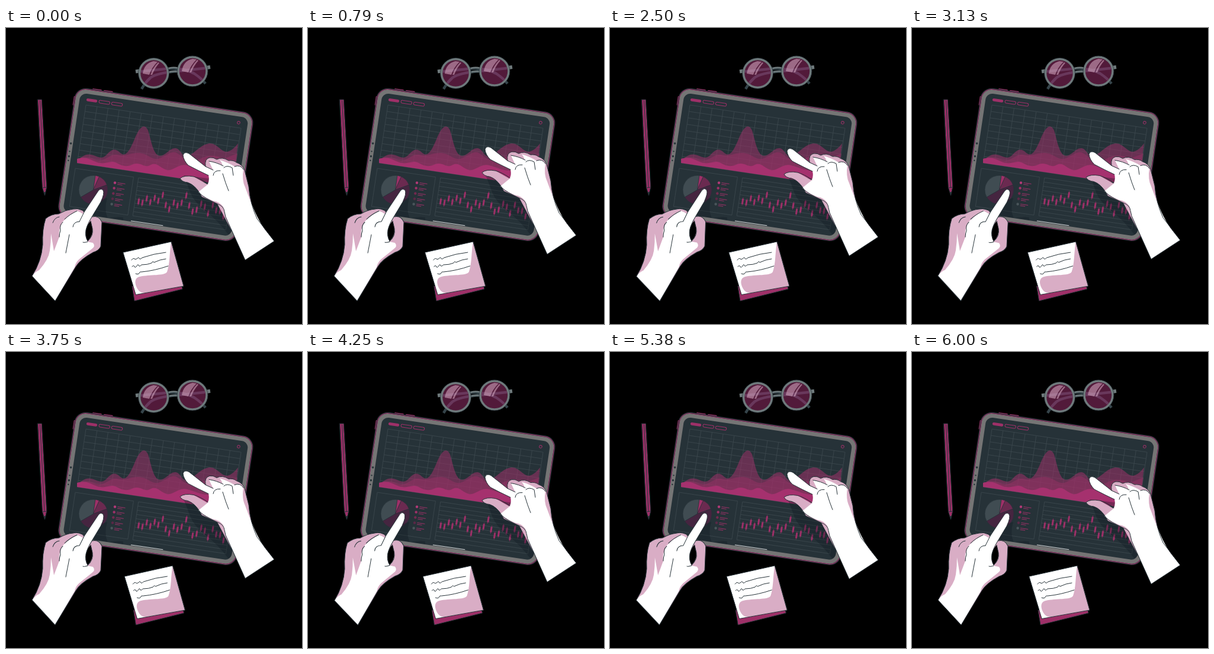
An HTML page that plays this animation: 500x500 px, repeating every 6.04 s.

```html
<!DOCTYPE html>
<html lang="en">
<head>
<meta charset="utf-8">
<title>Tablet dashboard</title>
<style>
  html, body { margin: 0; width: 100%; height: 100%; overflow: hidden; background: #000; }
  svg { display: block; width: 100vw; height: 100vh; }
  .ink { fill: none; stroke: #263238; stroke-width: 1; stroke-linecap: round; stroke-linejoin: round; }
  .skin { fill: #fff; }
  .shade { fill: #d9adc5; }
  .brand { fill: #9e3068; }
  .rule { fill: none; stroke: #3d494f; stroke-width: .8; }
  .edge { fill: none; stroke: #9e3068; stroke-width: 1; }
</style>
</head>
<body>
<svg viewBox="0 0 500 500">
  <defs>
    <linearGradient id="hill" x1="0" y1="0" x2="0" y2="1">
      <stop offset="0" stop-color="#9e3068" stop-opacity=".72"/>
      <stop offset="1" stop-color="#9e3068" stop-opacity=".82"/>
    </linearGradient>
    <clipPath id="lenses"><circle cx="249.500" cy="76.500" r="22"/><circle cx="315" cy="73" r="22"/></clipPath>
    <clipPath id="screen"><rect x="8" y="8" width="287" height="202" rx="11" transform="translate(119.200 100.400) rotate(8.500)"/></clipPath>
    <path id="arms" d="M222 74 L280 68 Q305 69 318 77 Q330 85 337 94 M343 67 L290 73 Q254 76 244 84 Q236 91 229 103"/>
  </defs>

  <!-- glasses -->
  <g fill="none">
    <use href="#arms" stroke="#35444a" stroke-width="4.500"/>
    <g fill="#521a3a"><circle cx="249.500" cy="76.500" r="23"/><circle cx="315" cy="73" r="23"/></g>
    <g clip-path="url(#lenses)">
      <use href="#arms" stroke="#69385c" stroke-width="4.500"/>
      <g fill="#d9adc5" opacity=".55">
        <path d="M231 77 Q233 60 249 56 L256 57 Q246 67 242 79 Z M244 79 Q248 67 257 58 L259 59 Q251 68 247 79 Z"/>
        <path d="M297 73 Q299 56 315 52 L322 53 Q312 63 308 75 Z M310 75 Q314 63 323 54 L325 55 Q317 64 313 75 Z"/>
      </g>
    </g>
    <g stroke="#6f7a7c" stroke-width="3.600">
      <circle cx="249.500" cy="76.500" r="24"/><circle cx="315" cy="73" r="24"/>
      <path d="M273 69 Q282 65 291 68 M274 75 Q282 72 291 74" stroke-width="2.400"/>
      <path d="M219 73.500 L226 72.500 M338 67 L345 66" stroke-width="6"/>
    </g>
    <g stroke="#263238" stroke-width=".7"><circle cx="249.500" cy="76.500" r="26"/><circle cx="315" cy="73" r="26"/></g>
  </g>

  <!-- pencil -->
  <path class="brand" d="M54 121 L60 121 L68.500 269 L65.500 282 L61.500 270 Z"/>
  <path class="ink" d="M53.500 121 L60.500 121 L68.800 269 L65.500 283 L61.500 270 Z M57.500 123 L65 269 M61.500 270 L68.500 269"/>
  <path d="M64 277 L67 277 L65.500 283 Z" fill="#263238"/>

  <!-- tablet -->
  <g transform="translate(119.200 100.400) rotate(8.500)">
    <g class="brand"><rect x="27" y="-2.500" width="16" height="4" rx="1.500"/><rect x="46" y="-2.500" width="16" height="4" rx="1.500"/><rect x="-2.200" y="15" width="4" height="16" rx="1.500"/></g>
    <rect width="303" height="218.500" rx="18" fill="#757575" stroke="#263238" stroke-width="2.400"/>
    <rect x=".6" y=".6" width="301.800" height="217.300" rx="17.400" class="edge" stroke-width="1.400"/>
    <rect x="8" y="8" width="287" height="202.500" rx="11" fill="#263238"/>
    <g id="dots" fill="#263238"></g>
    <rect x="19.500" y="15.500" width="18.500" height="4.800" rx="2.400" class="brand"/>
    <rect x="41" y="15.500" width="18.500" height="4.800" rx="2.400" class="edge"/>
    <rect x="62.500" y="15.500" width="18.500" height="4.800" rx="2.400" class="edge"/>
    <circle cx="279.600" cy="18.400" r="2.300" class="edge"/>
    <path id="grid" class="rule"/>
    <path id="panels" class="rule"/>
    <path d="M124 210 H179" stroke="#d5d8d9" stroke-width="1" transform="translate(0 -.7)"/>
  </g>
  <path fill="url(#hill)" opacity=".72" d="M120 227 C127 215 138 211 148 215 S163 222 171 213 S185 203 192 210 C202 220 209 207 217 188 C224 170 233 158 240 173 C246 193 249 215 260 216 C271 215 276 203 286 203 C296 204 297 220 308 216 C323 208 329 197 343 195 C357 194 363 210 374 209 C382 207 387 201 392 195 L383 267 Z"/>
  <path class="brand" opacity=".42" d="M120 227 C131 216 140 218 150 222 C166 229 175 211 188 214 C203 218 209 211 222 211 C240 211 244 223 257 221 C271 217 280 205 290 212 C304 222 311 229 326 222 C344 212 354 216 370 220 L391 212 L383 267 Z"/>
  <path fill="#a5316e" d="M120 228 V221 C135 216 143 223 154 227 C169 232 175 222 187 228 C198 234 204 235 215 230 C228 226 233 237 243 232 C255 225 260 237 272 240 C283 242 292 228 306 232 C322 236 337 245 350 239 L387 242 L383 267 Z"/>
  <g id="pie"></g>
  <g id="legend"></g>
  <g id="candles" class="brand"></g>
  <g clip-path="url(#screen)" fill="#101a20" opacity=".32">
    <path d="M300 249 L341 254 L412 240 L412 350 L378 352 Q360 327 337 309 Q317 294 310 275 Q306 262 300 249 Z"/>
    <path d="M159 291 L171 287 Q165 307 172 322 Q186 318 198 320 L198 335 L128 324 Z"/>
  </g>

  <!-- note -->
  <g id="note">
    <path class="brand" d="M213 436 L217 461 L298 441 L296 430 Z"/>
    <path class="ink" d="M213 436 L217 461 L298 441 L296 430"/>
    <path class="skin" d="M198 379 L279 361 L300 436 L219.500 450.500 Z"/>
    <path class="shade" d="M279 361 C276 379 277 399 272 412 C268 419 243 416 226 420 C216 422 217 433 223 442 Q227 448 235 447.700 L300 436 Z"/>
    <path class="ink" d="M198 379 L279 361 L300 436 L219.500 450.500 Z"/>
    <path class="ink" d="M212 392 q3 -4 5 -2 t5 -1 q2 -3 3 0 t5 -1 Q250 381 270 379 M213 403 q3 -3 4 0 t4 -1 q2 -4 3 -1 t5 -1 q10 0 17 -3 q2 -4 4 -1 Q260 391 270 390 M219 415 q5 2 6 -1 t4 -2 Q251 410 274 402"/>
  </g>

  <!-- left hand -->
  <g id="leftHand">
    <path class="shade" fill-rule="evenodd" d="M67 322 Q77 314 89 314 Q101 307 113 306 Q121 304 129 308 L132 311 L154 278 Q159 269 164 274 Q167 279 160 294 L145 319 Q157 316 162 328 L160 369 Q157 376 147 379 Q125 391 118 403 L83 461 L44 419 Q60 394 62 366 Q61 340 67 322 Z M143 326 Q137 332 135 341 Q133 350 138 360 Q147 351 146 339 Z"/>
    <path class="skin" d="M154 278 Q159 269 164 274 Q167 279 160 294 L146 317 Q137 332 135 341 Q133 353 138 361 L147 363 Q152 369 144 374 L123 391 Q117 397 116 404 L83 461 L44 419 Q50 411 56 409 Q72 391 74 376 Q76 362 76 347 L81 377 L90 353 Q88 339 96 327 Q107 315 120 309 Q126 311 130 314 Z"/>
    <path class="ink" d="M67 322 Q77 314 89 314 Q101 307 113 306 Q121 304 129 308 L132 311 L154 278 Q159 269 164 274 Q167 279 160 294 L145 319 Q157 316 162 328 L160 369 Q157 376 147 379 Q125 391 118 403 L83 461 L44 419 Q60 394 62 366 Q61 340 67 322 Z M145 319 Q137 332 135 341 Q133 352 138 360 Q148 351 146 339 L143 326 M138 361 Q132 363 130 362 M90 353 Q90 347 92 342 Q90 333 96 328 M113 336 Q114 327 124 327 M124 327 L132 311 M107 349 L101 380 M79 329 Q82 320 90 319 M99 323 Q107 315 120 309"/>
  </g>

  <!-- right hand -->
  <g id="rightHand">
    <path class="shade" d="M294 254 Q301 248 317 251 L340 264 L352 246 L337 233 Q335 221 344 219 Q350 218 356 222 Q365 217 376 224 Q384 223 389 227 Q400 231 403 240 L410 268 Q412 296 424 322 L447 354 L380 340 L357 297 L331 285 Q320 265 307 261 Q297 260 294 254 Z"/>
    <path class="skin" d="M299 215 Q301 208 309 212 L337 234 L350 240 Q345 230 343 225 Q356 227 366 232 Q364 226 361 223 Q375 227 386 234 Q395 231 401 238 Q398 257 404 269 Q411 288 417 302 Q423 318 436 339 L453 360 L404 392 L371 319 Q368 309 367 302 Q360 293 350 292 Q332 285 325 277 L341 264 Q344 256 342 249 Q325 241 308 232 Q300 224 299 215 Z"/>
    <path class="ink" d="M341 263 Q328 254 317 251 Q301 248 294 254 Q297 260 307 261 Q319 265 328 280 Q335 287 357 297 Q368 301 369 310 L371 319 L404 392 L453 360 L424 322 Q412 296 410 268 L403 240 Q400 231 389 227 Q384 223 376 224 Q365 217 356 222 Q350 218 344 219 Q335 221 337 234 L309 212 Q301 208 299 215 Q300 224 308 232 Q325 241 342 249 M337 234 L350 240 M350 249 Q351 240 362 241 M343 225 Q356 227 367 233 M368 236 Q373 231 382 236 L384 249 M386 234 Q396 230 401 239 M366 246 Q371 263 376 275"/>
  </g>
</svg>
<script>
const $ = id => document.getElementById(id);
const range = n => [...Array(n).keys()];

// static dashboard details
$('dots').innerHTML = [95, 108.5, 117, 124].map((y, i) =>
  `<circle cx="4.500" cy="${y}" r="${i % 2 ? 1.2 : 1.7}"/>`).join('');
$('grid').setAttribute('d',
  range(15).map(i => `M${20 + i * 18.93} 27 V126`).join('') +
  range(10).map(i => `M20 ${27 + i * 11} H285`).join(''));
$('panels').setAttribute('d', 'M18 135.5 H117.5 V200.5 H18 Z M126 135.5 V200.5 M285 135.5 V200.5' +
  range(10).map(i => `M126 ${135.5 + i * 7.22} H285`).join(''));

function slice(from, to, color) {
  const at = deg => {
    const a = deg * Math.PI / 180;
    return `${147.5 + 24.5 * Math.cos(a)} ${273.5 + 24.5 * Math.sin(a)}`;
  };
  return `<path d="M147.5 273.5 L${at(from)} A24.5 24.5 0 ${+(to - from > 180)} 1 ${at(to)} Z"
    fill="${color}" stroke="#263238" stroke-width=".6"/>`;
}
$('pie').innerHTML = slice(150, 278, '#404c52') + slice(278, 294, '#9e3068') +
  slice(294, 340, '#6b2a50') + slice(-20, 150, '#452540');

$('legend').innerHTML = ['#b23a78', '#9e3068', '#74294f', '#5a2846', '#4a565b'].map((color, i) => {
  const x = 184 - i * 1.35, y = 261.5 + i * 9;
  return `<circle cx="${x}" cy="${y}" r="2.200" fill="${color}"/>
    <path d="M${x + 4.5} ${y} l13 1.900 M${x + 4} ${y + 2.6} l8.500 1.200" stroke="#9e3068" stroke-width="1"/>`;
}).join('');

const candleY = [293, 295, 288, 294, 287, 292, 282, 299, 306, 295, 300, 295,
  283, 300, 310, 307, 297, 302, 313, 299, 308, 309, 318];
$('candles').innerHTML = candleY.map((y, i) => {
  const x = 223.6 + i * 6.63 - (y - 297) * .1;
  return `<g transform="translate(${x} ${y}) rotate(8.500)"><rect x="-1.500" y="-4.700" width="3" height="9.400"/>
    <rect x="-.3" y="-7" width=".6" height="14"/></g>`;
}).join('');

// linear interpolation through [phase, value] stops
function track(stops, phase) {
  const i = Math.max(1, stops.findIndex(s => s[0] >= phase));
  const [p0, v0] = stops[i - 1], [p1, v1] = stops[i];
  return v0 + (v1 - v0) * (phase - p0) / (p1 - p0);
}
const lift = [[0, 0], [.5, -10], [1, 0]];
const sway = [[0, 0], [.25, 1], [.75, -1], [1, 0]];
const shake = [[0, 0], [.1, -1], [.2, 2], [.3, -4], [.4, 4], [.5, -4],
  [.6, 4], [.7, -4], [.8, 2], [.9, -1], [1, 0]];

const LOOP = 6040, STEP = 40;
function draw(time) {
  const t = Math.floor(time % LOOP / STEP) * STEP;
  const beat = t % 1500 / 1500;
  $('rightHand').setAttribute('transform', `translate(0 ${track(lift, beat)})`);
  $('leftHand').setAttribute('transform', `rotate(${track(sway, beat)} 104 367)`);
  $('note').setAttribute('transform', `translate(${track(shake, t / 6000)} 0)`);
}

const start = performance.now();
function tick() {
  draw(performance.now() - start);
  requestAnimationFrame(tick);
}
tick();
</script>
</body>
</html>
```
